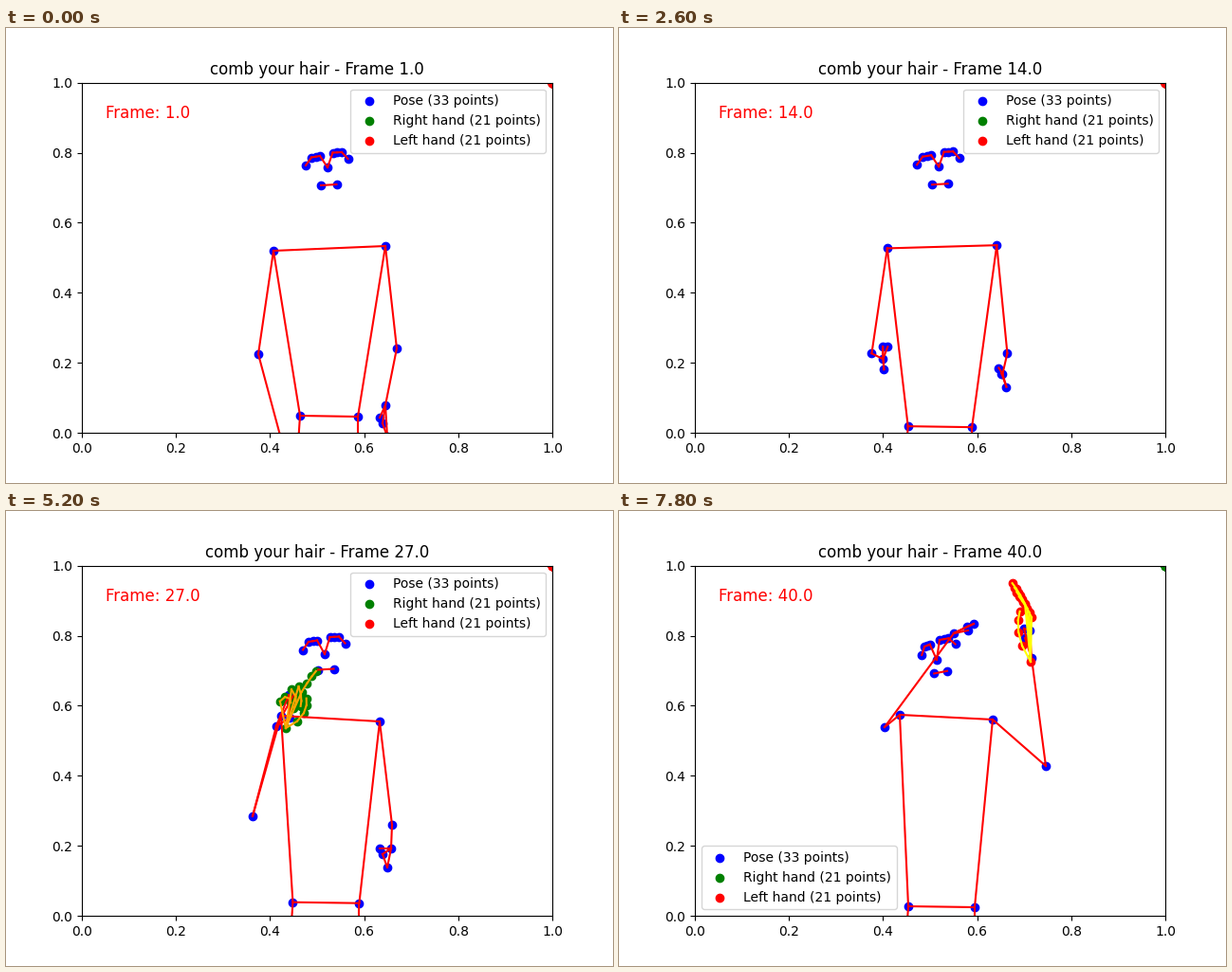
These frames come from a looping animation (640x480 px, 8000 ms). A matplotlib script:

```python
import numpy as np
import matplotlib.pyplot as plt
from matplotlib.animation import FuncAnimation

W, H, DPI = 640, 480, 100
FRAMES, STEP = 40, 200


def ramp(i, start, end):
    u = np.clip((i - start) / (end - start), 0, 1)
    return u * u * (3 - 2 * u)


def vec(*p):
    return np.array(p, float)


def path(*knots):
    """Eased motion through (frame, x, y) knots."""
    def at(i):
        p = vec(*knots[0][1:])
        for (t0, *a), (t1, *b) in zip(knots, knots[1:]):
            p += (vec(*b) - a) * ramp(i, t0, t1)
        return p
    return at


def rotation(degrees):
    c, s = np.cos(np.radians(degrees)), np.sin(np.radians(degrees))
    return np.array([(c, s), (-s, c)])


nose = path((0, 339, 147), (8, 336, 148), (17, 338, 145), (26, 336, 151),
            (32, 340, 151), (39, 335, 157))
hips = path((0, 340.5, 409.5), (8, 339, 421.5), (17, 338, 420),
            (22, 337, 412.5), (39, 340, 417.5))

left_shoulder = path((0, 400, 230), (17, 398, 229), (26, 394, 222),
                     (32, 396, 224), (39, 394, 220))
left_elbow = path((0, 412, 338), (17, 409, 344), (26, 407, 331),
                  (32, 417, 340), (39, 450, 269))
left_wrist = path((0, 400, 398), (8, 405, 369), (17, 404, 362),
                  (22, 407, 350), (26, 406, 356), (32, 398, 354),
                  (39, 435, 155))
left_index = path((0, -3, 19), (8, -1, -1), (22, -1, 1), (26, -9, 6),
                  (32, -12, -8), (39, -8, -31))

right_shoulder = path((0, 282, 235), (17, 283, 232), (26, 290, 216),
                      (32, 289, 220), (39, 296, 215))
right_elbow = path((0, 266, 344), (8, 267, 338), (17, 266, 347),
                   (26, 260, 322), (32, 258, 336), (39, 280, 228))
right_wrist = path((0, 295, 452), (8, 276, 365), (17, 280, 338),
                   (22, 274, 237), (26, 285, 227), (32, 307, 275),
                   (39, 353, 129))
right_index = path((0, 5, 18), (8, 0, -9), (17, 0, -16), (24, 11, -35),
                   (32, 25, -21), (39, 21, -10))

# Pinky and thumb relative to the index knuckle, arm down and arm raised.
left_pinky, left_thumb = path((32, 5, 14), (39, 6, 2)), path((32, -3, -6), (39, 1, 10))
right_pinky, right_thumb = path((32, 1, 24), (39, -7, 3)), path((32, 5, 0), (39, -6, 7))


def face(i):
    """Nose, three left eye points, three right eye points, ears, mouth."""
    turn = ramp(i, 32, 39)
    left = np.linspace((5.5, -15.5), (15, -16), 3)
    right = np.linspace((-8, -12), (-17, -10.5), 3)
    shape = np.vstack([left, right, (21.5, -9), (-23, -2), (9.5, 18), (-7, 19)])
    shape[:, 1] -= 2.5 * (ramp(i, 17, 22) + turn)
    shape[shape[:, 0] < 0, 0] *= 1 - 0.35 * turn
    return nose(i) + np.vstack([(0, 0), shape @ rotation(-7 * turn)])


def pose_at(i):
    lw, rw = left_wrist(i), right_wrist(i)
    li, ri = lw + left_index(i), rw + right_index(i)
    half = vec(30.5 + 4.5 * ramp(i, 0, 20), 0.5)
    lh, rh = hips(i) + half, hips(i) - half
    return np.vstack([
        face(i),
        left_shoulder(i), right_shoulder(i), left_elbow(i), right_elbow(i),
        lw, rw,
        li + left_pinky(i), ri + right_pinky(i), li, ri,
        li + left_thumb(i), ri + right_thumb(i),
        lh, rh, lh + (0, 120), rh + (-8, 120)])


def finger(root, length, heading, turn, joints=3):
    k = np.arange(joints)
    a = np.radians(heading + turn * k)
    steps = length * 0.8 ** k
    return root + np.cumsum(np.column_stack([steps * np.cos(a), steps * np.sin(a)]), axis=0)


def hand(thumb, index, pinky, bulge, bends):
    """21 points around the palm root; bends hold length, heading, turn."""
    points = [vec((0, 0)), finger((0, 0), *thumb, joints=4)]
    for k, bend in enumerate(bends):
        knuckle = index + (pinky - index) * k / 3 + bulge * np.sin(np.pi * k / 3)
        points += [knuckle, finger(knuckle, *bend)]
    return np.vstack(points)


RIGHT = hand((16, -40, -20), vec(12, -46), vec(-12, -31), vec(4, -13),
             [(12.7, -67, 3), (10, 65, 12), (10, 50, 28), (8, -50, 60)])
LEFT = hand((19, -118, 13), vec(-6, -61), vec(1, -47), vec(0, 0),
            [(10.5, -118, -4)] * 4)


def right_hand(i, wrist):
    if not 20 <= i <= 29:
        return None
    lean = ramp(i, 22, 26)
    shape = RIGHT @ rotation(9 * lean) * (1 - 0.13 * lean)
    return wrist + (15 - 5 * lean, 2 * lean) + shape


def left_hand(i, wrist):
    return wrist + (-1, 4) + LEFT if i >= 38 else None


def chains(*paths):
    return np.array([pair for p in paths for pair in zip(p, p[1:])])


BONES = chains(
    (8, 6, 5, 4, 0, 1, 2, 3, 7), (9, 10),
    (11, 12), (11, 13, 15, 17, 19, 15, 21),
    (12, 14, 16, 18, 20, 16, 22),
    (11, 23, 24, 12), (23, 25), (24, 26))
FINGERS = chains(*[(0, *range(k, k + 4)) for k in range(1, 21, 4)])


def to_data(p):
    return np.column_stack([(p[:, 0] - 80) / 496, (427.2 - p[:, 1]) / 369.6])


def draw_part(points, edges, dot, line, label):
    # An undetected part collapses into the top right corner.
    seen = points is not None
    xy = to_data(points) if seen else np.ones((21, 2))
    ax.scatter(xy[:, 0], xy[:, 1], c=dot, label=label)
    if seen:
        ax.plot(xy[edges, 0].T, xy[edges, 1].T, color=line)


def draw(i):
    ax.clear()
    ax.set(xlim=(0, 1), ylim=(0, 1))
    pose = pose_at(i)
    left = left_hand(i, pose[15])
    draw_part(pose, BONES, "blue", "red", "Pose (33 points)")
    draw_part(right_hand(i, pose[16]), FINGERS, "green", "orange",
              "Right hand (21 points)")
    draw_part(left, FINGERS, "red", "yellow", "Left hand (21 points)")
    count = float(i + 1)
    ax.set_title(f"comb your hair - Frame {count}")
    ax.text(0.05, 0.9, f"Frame: {count}", fontsize=12, color="red")
    ax.legend(loc="upper right" if left is None else "lower left")


fig, ax = plt.subplots(figsize=(W / DPI, H / DPI), dpi=DPI)
anim = FuncAnimation(fig, draw, frames=FRAMES, interval=STEP,
                     repeat=True, repeat_delay=0)
plt.show()
```
